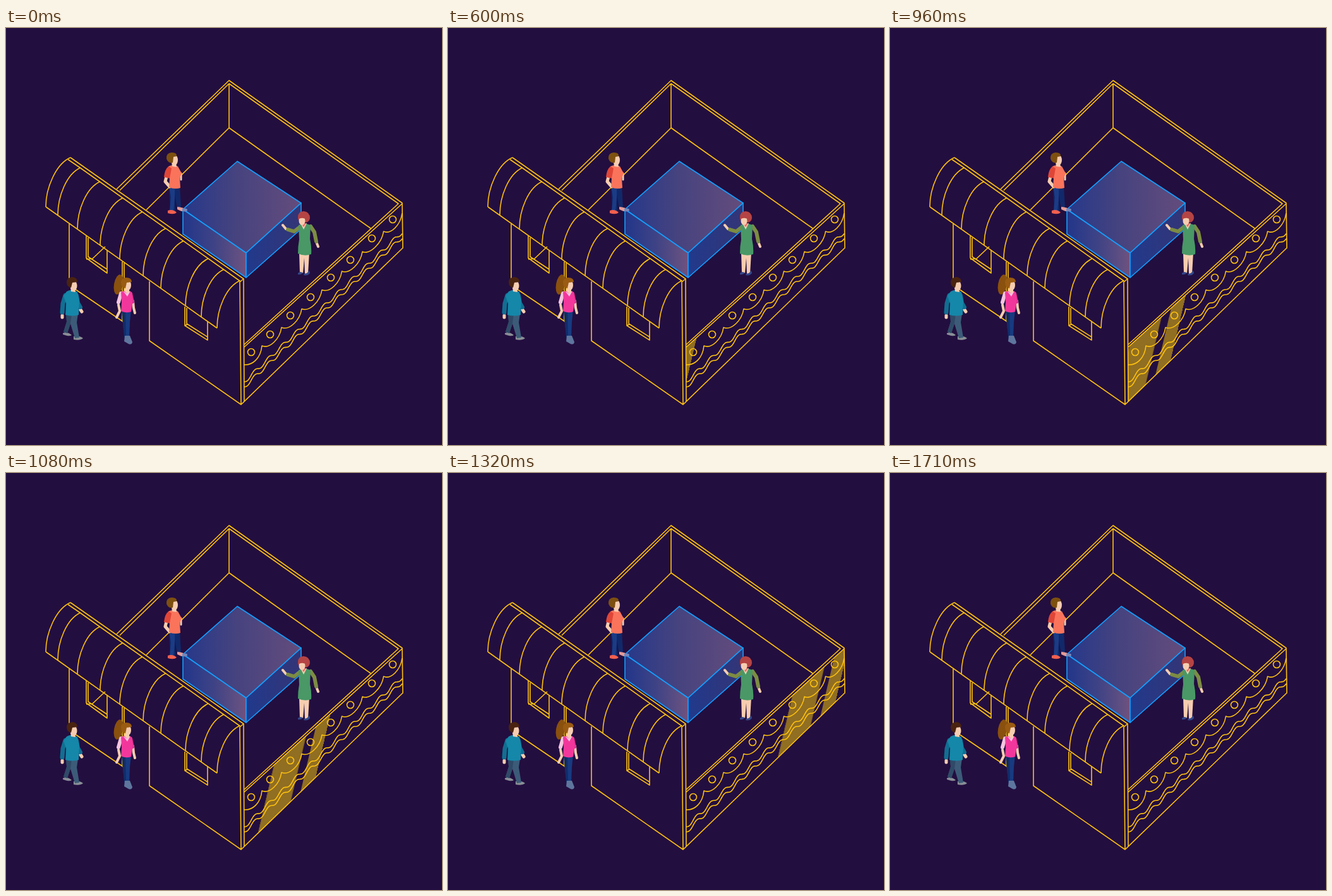
Write an HTML page that moves like this. It is 690 px wide and 660 px high and loops after 1.74 s.

```html
<!DOCTYPE html>
<html lang="en">
<head>
<meta charset="utf-8">
<title>Isometric pavilion</title>
<style>
  html, body { margin: 0; width: 100%; height: 100%; overflow: hidden; background: #230e40; }
  svg { display: block; width: 100%; height: 100%; }
  .line { fill: none; stroke: #ffc20e; stroke-width: 1.6; stroke-linejoin: round; }
  .box { stroke: #149fff; stroke-width: 1.6; stroke-linejoin: round; }
  .limb { fill: none; stroke-linecap: round; stroke-linejoin: round; }
  .skin { fill: #f6cdb0; }
  .limb.skin { fill: none; stroke: #f6cdb0; }
  .shine { fill: #906e22; animation: sweep 1740ms infinite, reveal 1740ms step-end infinite; }
  @keyframes sweep {
    0%, 27.87% { transform: translateX(0); animation-timing-function: cubic-bezier(.333, 0, .667, .333); }
    86.2%, 100% { transform: translateX(285px); }
  }
  @keyframes reveal {
    0% { opacity: 0; }
    32.7% { opacity: 1; }
    90% { opacity: 0; }
  }
</style>
</head>
<body>
<svg viewBox="0 0 690 660">
  <defs>
    <clipPath id="wall"><path d="M377 504L627 278L628 348L377 592Z"/></clipPath>
    <linearGradient id="top">
      <stop offset="0" stop-color="#26388a"/><stop offset=".45" stop-color="#46437f"/><stop offset="1" stop-color="#644c7c"/>
    </linearGradient>
    <linearGradient id="left">
      <stop offset="0" stop-color="#22368a"/><stop offset=".5" stop-color="#3f4385"/><stop offset="1" stop-color="#6d5380"/>
    </linearGradient>
    <linearGradient id="right">
      <stop offset="0" stop-color="#21398c"/><stop offset="1" stop-color="#343576"/>
    </linearGradient>
  </defs>

  <g clip-path="url(#wall)">
    <g transform="matrix(1 0 -.235 1 0 0)">
      <g class="shine">
        <rect x="434.5" width="40" height="660"/>
        <rect x="486.5" width="18.5" height="660"/>
      </g>
    </g>
  </g>

  <!-- room -->
  <path class="line" d="M175 255L353 83L627 277L628 348L372 596L227 495V401
    M180 257L353 88L621 278L377 501M353 88V158M222 288L353 158L577 317
    M627 278L377 505M376 397L377 592M370 402L372 596
    M100 310V407L187 466M184 370V464M187 372V464"/>
  <!-- windows -->
  <path class="line" d="M127 329V364L160 388V352M130 332V362L160 382M127 366L137 365L157 346
    M283 441V471L319 494V465M286 443V468L319 489M283 471L287 469"/>
  <!-- awning -->
  <path class="line" d="M63 283L334 475M102 205L376 397L370 402M98 208L117 221L371 401"/>
  <path class="line" id="ribs"/>
  <path class="line" id="trim"/>

  <!-- boy by the box -->
  <g>
    <path fill="#11296a" d="M258 248L275 249L277 284L271 287L267 264L268 290L260 291Z"/>
    <path fill="#1b3c86" d="M258 248L267 249L267 270L265 290L259 289L261 268Z"/>
    <path fill="#f2604f" d="M256 289Q264 286 270 292Q266 296 256 293Z"/>
    <path fill="#e79a96" d="M271 283Q279 283 287 289Q282 293 271 287Z"/>
    <path class="limb skin" stroke-width="5" d="M254 235L252 243L259 251"/>
    <path class="limb skin" stroke-width="3" d="M277 230L277 240"/>
    <path fill="#fa745c" d="M257 219Q265 215 272 219L278 230L275 238L276 253Q267 256 258 252L259 238Z"/>
    <path fill="#df4638" d="M257 219Q251 224 250 236L259 238L262 222Z"/>
    <path class="skin" d="M262 212L269 213L270 220L263 219Z"/>
    <ellipse class="skin" cx="267" cy="209" rx="5" ry="8"/>
    <path fill="#7d500f" d="M254 207Q253 198 262 197Q271 197 270 203L265 204L264 213Q257 215 254 207Z"/>
  </g>

  <!-- box -->
  <path class="box" fill="url(#top)" d="M366 211L467 277L380 356L280 287Z"/>
  <path class="box" fill="url(#left)" d="M280 287L380 356V395L280 326Z"/>
  <path class="box" fill="url(#right)" d="M380 356L467 277V318L380 395Z"/>
  <ellipse cx="283" cy="288" rx="4" ry="2.5" fill="#7486bd"/>

  <!-- woman in green -->
  <g>
    <path class="skin" d="M464 355H480L478 389H473L472 364L470 388H465Z"/>
    <path fill="#33488c" d="M472 389L476 388L480 384L481 388Q477 393 471 391Z"/>
    <path fill="#33488c" d="M462 388L465 386L470 387Q467 391 462 390Z"/>
    <path class="limb skin" stroke-width="4" d="M438 312L443 318M492 341L494 346"/>
    <path class="limb" stroke="#7d8c43" stroke-width="6" d="M465 315L456 322L446 319M482 314L488 323L491 338"/>
    <path fill="#499866" d="M463 312Q472 307 482 312L481 334Q484 347 483 358Q473 362 462 357Q462 345 464 335Z"/>
    <path class="skin" d="M466 309H476L471 319Z"/>
    <path fill="#e66d66" d="M467 309H475L471 315Z"/>
    <path fill="#b54444" d="M462 300Q462 290 471 290Q481 291 481 301Q480 307 474 308L464 306Z"/>
    <ellipse class="skin" cx="468.500" cy="305" rx="5" ry="7"/>
    <path fill="#b54444" d="M462 301Q465 293 475 296L476 304Q470 298 462 303Z"/>
  </g>

  <!-- man in teal -->
  <g>
    <path fill="#8a8f96" d="M90 483Q97 480 104 486Q101 489 90 485ZM107 488Q116 486 122 491Q117 495 107 493Z"/>
    <path fill="#3c5b79" d="M95 452H114L112 466L116 490L109 491L102 468L97 483L91 481L96 465Z"/>
    <path fill="#2f4a67" d="M95 452L104 453L102 468L97 483L91 481L96 465Z"/>
    <path class="limb skin" stroke-width="5" d="M89 455L89 458M118 446L120 449"/>
    <path class="limb" stroke="#106f92" stroke-width="7" d="M94 423L90 436L89 450"/>
    <path class="limb" stroke="#106f92" stroke-width="6" d="M112 423L114 435L118 442"/>
    <path fill="#1587a9" d="M96 417Q105 412 113 418L116 432L115 454Q105 457 94 454L95 436L91 424Z"/>
    <path class="skin" d="M102 410H109L110 418L103 417Z"/>
    <ellipse class="skin" cx="107" cy="408" rx="5.500" ry="8"/>
    <path fill="#49230f" d="M96 402Q96 395 105 394Q113 395 113 402L105 403L103 411Q96 410 96 402Z"/>
  </g>

  <!-- girl with ponytail -->
  <g>
    <ellipse cx="178" cy="406" rx="7" ry="16" fill="#8a500d" transform="rotate(10 178 406)"/>
    <path fill="#173a80" d="M183 446H198L196 466L195 492H188L185 468Z"/>
    <path fill="#112c69" d="M183 446L189 447L190 490L187 490L185 468Z"/>
    <path fill="#5e769d" d="M188 487H196L200 497Q199 502 194 500L187 496Z"/>
    <path class="limb skin" stroke-width="4" d="M178 438L180 448L175 458M201 432L202 443L204 451"/>
    <path class="limb" stroke="#f6c4df" stroke-width="6" d="M182 420L178 434"/>
    <path class="limb" stroke="#d92b87" stroke-width="4" d="M198 420L201 434"/>
    <path fill="#f2379c" d="M182 418Q191 413 199 418L201 432L198 449Q190 452 182 448L183 434Z"/>
    <path fill="#f6c4df" d="M185 416L191 420L197 416L192 425Z"/>
    <path class="skin" d="M188 410H195L195 418L191 420L187 416Z"/>
    <ellipse class="skin" cx="193" cy="407" rx="5" ry="8"/>
    <path fill="#9a5b12" d="M182 403Q182 395 190 395Q199 395 199 402L191 403L189 412Q182 411 182 403Z"/>
  </g>
</svg>
<script>
  const setPath = (id, d) => document.getElementById(id).setAttribute('d', d);

  const ribs = [[82, 296], [113, 318], [149, 344], [180, 366], [217, 392], [245, 412], [284, 440], [309, 457], [334, 475]];
  setPath('ribs', 'M63 283c0-30 16-68 39-78' +
    ribs.map(([x, y]) => `M${x} ${y}c0-30 14-65 36-75`).join(''));

  const rings = [[388, 513], [418, 485], [450, 455], [482, 426], [514, 395], [545, 367], [579, 333], [612, 303]];
  const cusps = rings.slice(1).map(([x, y], i) => [(x + rings[i][0]) / 2 + 2, (y + rings[i][1]) / 2 + 4]);
  cusps.push([627, 293]);

  const ring = ([x, y]) => `M${x - 5.5} ${y}a5.5 5.5 0 1 0 11 0a5.5 5.5 0 1 0-11 0`;
  const scallop = ([x, y], i) => i
    ? `C${cusps[i - 1][0] + 12} ${cusps[i - 1][1] + 5} ${x - 3} ${y + 19} ${x} ${y}`
    : `M377 533C390 534 403 523 ${x} ${y}`;

  // Ripple running parallel to the foot of the wall
  function wave(startY) {
    let d = '';
    for (let x = 377; x <= 627; x += 2) {
      const y = startY - (x - 377) * .948 + 3.2 * Math.sin((x - 377) / 22 * 2 * Math.PI);
      d += `${d ? 'L' : 'M'}${x} ${y.toFixed(1)}`;
    }
    return d;
  }
  setPath('trim', rings.map(ring).join('') + cusps.map(scallop).join('') + wave(560) + wave(568));
</script>
</body>
</html>
```
